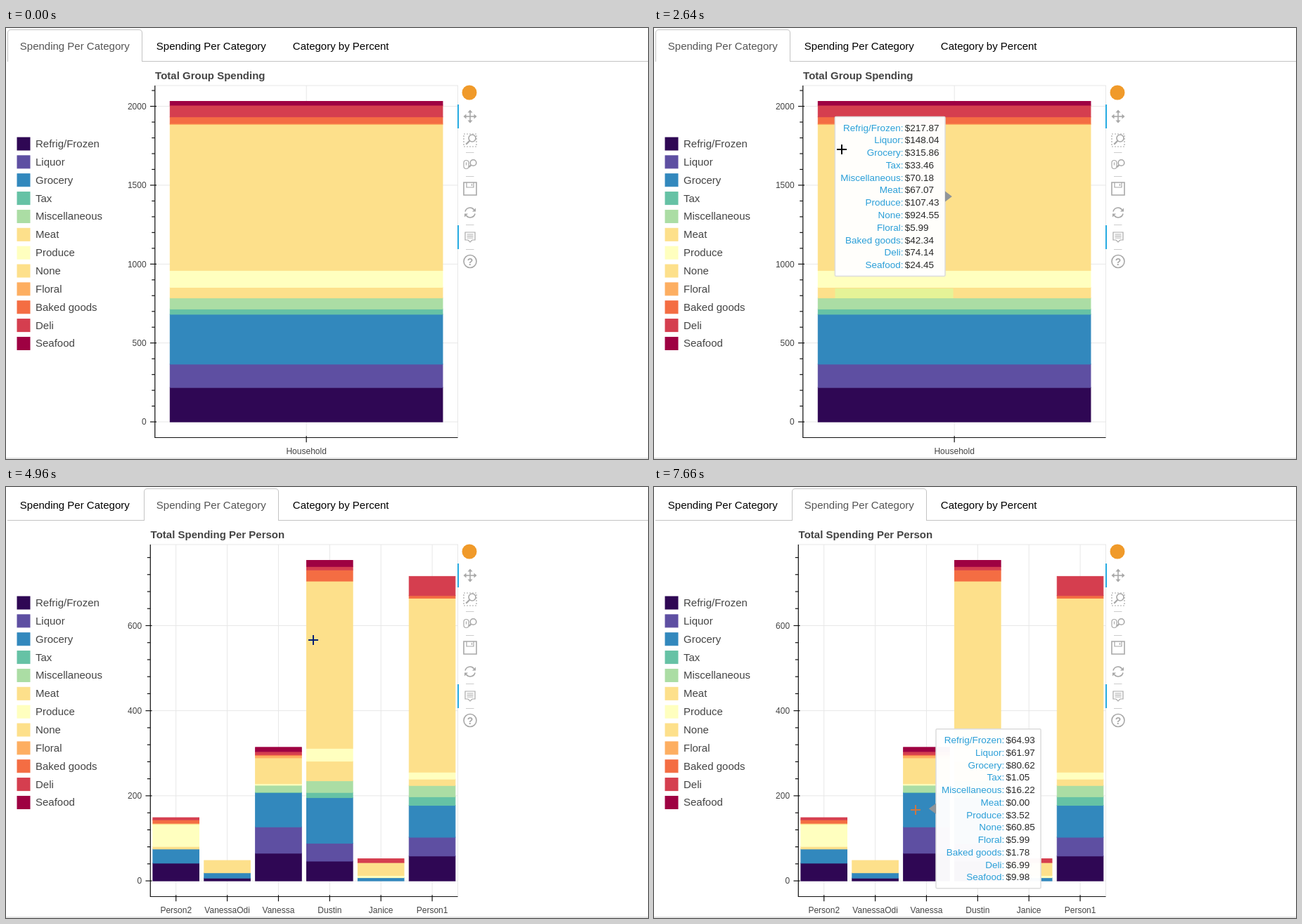
Write an HTML page that moves like this. It is 913 px wide and 614 px high and loops after 8000 ms.

```html
<!DOCTYPE html>
<html lang="en">
<head>
<meta charset="utf-8">
<title>Group spending</title>
<style>
html, body { margin: 0; width: 100%; height: 100%; overflow: hidden; background: #fff; }
svg { display: block; font-family: "Liberation Sans", Arial, sans-serif; }
text { white-space: pre; }
.tab, .legend { font-size: 15px; }
.legend { fill: #444; }
.tab.active { fill: #555; }
.title { font-size: 15px; font-weight: bold; fill: #444; }
.tick { font-size: 12px; fill: #444; }
.rule { stroke: #c4c4c4; }
.grid { stroke: #e7e7e7; fill: none; }
.axis { stroke: #111; stroke-width: 1.2; fill: none; }
.tip { font-size: 13.5px; fill: #2b9fd8; }
.tip .value { fill: #282828; }
.icons { stroke: #a8a8a8; stroke-width: 1.6; fill: none; }
.icons .thin { stroke-width: 1.2; }
.icons .thick { stroke-width: 2.3; }
.icons .solid { fill: #a8a8a8; stroke: none; }
.icons text { font-size: 14px; font-weight: bold; }
.divider { stroke: #ccc; }
#cross { stroke: #fff; stroke-width: 2; mix-blend-mode: difference; }
</style>
</head>
<body>
<svg id="stage" width="913" height="614" viewBox="0 0 913 614"></svg>
<script>
const LOOP = 8000, SWITCH = 3980, STEP = 120;
const BASE = 561.1, RISE = 456.6, TOP = 82, BOTTOM = 583.5, RIGHT = 642.5;

const colors = {
  'Refrig/Frozen': '#2f0754', Liquor: '#5e4fa2', Grocery: '#3288bd', Tax: '#66c2a5',
  Miscellaneous: '#abdda4', Meat: '#fde08b', Produce: '#ffffbf', None: '#fde08b',
  Floral: '#fdae61', 'Baked goods': '#f46d43', Deli: '#d53e4f', Seafood: '#9e0142'
};
const categories = Object.keys(colors);

// Spending per person; a missing category is zero
const people = {
  Person2: { 'Refrig/Frozen': 41.62, Grocery: 33.2, Meat: 5.99, Produce: 52, None: 2.49, 'Baked goods': 8.28, Deli: 5 },
  VanessaOdi: { 'Refrig/Frozen': 6.51, Grocery: 12.4, None: 29 },
  Vanessa: { 'Refrig/Frozen': 64.93, Liquor: 61.97, Grocery: 80.62, Tax: 1.05, Miscellaneous: 16.22,
    Produce: 3.52, None: 60.85, Floral: 5.99, 'Baked goods': 1.78, Deli: 6.99, Seafood: 9.98 },
  Dustin: { 'Refrig/Frozen': 46.41, Liquor: 41.96, Grocery: 107.25, Tax: 12.17, Miscellaneous: 27.47, Meat: 46.1,
    Produce: 30.19, None: 393.11, 'Baked goods': 26.29, Deli: 7.99, Seafood: 14.47 },
  Janice: { Grocery: 7.44, Produce: 5.3, None: 30.2, Deli: 9 },
  Person1: { 'Refrig/Frozen': 58.4, Liquor: 44.11, Grocery: 74.95, Tax: 20.24, Miscellaneous: 26.49, Meat: 14.98,
    Produce: 16.42, None: 408.9, 'Baked goods': 5.99, Deli: 45.16 }
};
const household = {};
for (const c of categories) household[c] = Object.values(people).reduce((s, p) => s + (p[c] || 0), 0);

const text = (cls, x, y, s, anchor = 'start') =>
  `<text class="${cls}" x="${x}" y="${y}" text-anchor="${anchor}">${s}</text>`;
const path = (cls, d) => `<path class="${cls}" d="${d}"/>`;
const line = (cls, x1, y1, x2, y2) => path(cls, `M${x1} ${y1}L${x2} ${y2}`);
const rect = (x, y, w, h, attrs) => `<rect x="${x}" y="${y}" width="${w}" height="${h}" ${attrs}/>`;
const paint = color => `fill="${color}" stroke="${color}"`;

function makeChart(title, left, data, major, minor) {
  const names = Object.keys(data), pitch = (RIGHT - left) / names.length;
  const total = name => Object.values(data[name]).reduce((a, b) => a + b);
  const scale = RISE / Math.max(...names.map(total));
  const y = v => BASE - v * scale;
  const bars = names.map((name, i) => {
    let sum = 0;
    const x = left + (i + 0.5) * pitch;
    const parts = categories.map(cat => {
      const value = data[name][cat] || 0, bottom = y(sum);
      sum += value;
      return { cat, value, bottom, top: y(sum) };
    });
    return { name, x, w: pitch * 0.9, parts, side: x < (left + RIGHT) / 2 - 1 ? 1 : -1 };
  });
  return { title, left, major, minor, y, bars };
}
const charts = [
  makeChart('Total Group Spending', 211.8, { Household: household }, 500, 100),
  makeChart('Total Spending Per Person', 205.3, people, 200, 40)
];
const pageAt = t => t < SWITCH ? 0 : 1;

function drawChart({ title, left, major, minor, y, bars }, id) {
  let grid = rect(left, TOP, RIGHT - left, BOTTOM - TOP, 'class="grid"'), stacks = '';
  let axes = path('axis', `M${left} ${TOP}V${BOTTOM}H${RIGHT}`);
  for (let v = 0; y(v) > TOP; v += minor) {
    const isMajor = v % major === 0;
    axes += line('axis', left - (isMajor ? 6.8 : 4.5), y(v), left + (isMajor ? 2.2 : 0), y(v));
    if (!isMajor) continue;
    grid += line('grid', left, y(v), RIGHT, y(v));
    axes += text('tick', left - 12.2, y(v) + 4.3, v, 'end');
  }
  for (const { name, x, w, parts } of bars) {
    grid += line('grid', x, TOP, x, BOTTOM);
    axes += line('axis', x, BOTTOM - 2.2, x, BOTTOM + 6.8) + text('tick', x, 607, name, 'middle');
    for (const p of parts) {
      if (p.value) stacks += rect(x - w / 2, p.top, w, p.bottom - p.top, paint(colors[p.cat]));
    }
  }
  return `<g id="chart${id}">${grid}${stacks}${axes}${text('title', left + 0.3, 73.3, title)}</g>`;
}

const tabX = i => 2.5 + i * 194;
const tabShape = i => `M${tabX(i)} 48V7q0-4.500 4.500-4.500h182q4.500 0 4.500 4.500V48`.replace(/00 /g, ' ');
const drawTabs = () =>
  line('rule', 2, 47.5, 913, 47.5) +
  `<path id="hoverTab" d="${tabShape(1)}" fill="#ececec"/>` +
  '<path id="activeTab" class="rule" fill="#fff"/>' +
  ['Spending Per Category', 'Spending Per Category', 'Category by Percent']
    .map((s, i) => text('tab', tabX(i) + 17.3, 31, s)).join('');

const drawLegend = () => categories.map((name, i) => {
  const y = 165 + i * 25.86;
  return rect(16, y - 9, 18, 18, paint(colors[name])) + text('legend', 42, y + 5, name);
}).join('');

function drawTools() {
  const at = (y, body) => `<g transform="translate(660 ${y})">${body}</g>`;
  const turn = (count, body) => Array.from({ length: count }, (_, i) =>
    `<g transform="rotate(${i * 360 / count})">${body}</g>`).join('');
  const lens = (x, y, r, end) => `<circle cx="${x}" cy="${y}" r="${r}" fill="#fff"/>` +
    path('thick', `M${x - r * 0.75} ${y + r * 0.75}l${-end} ${end}`);
  return '<circle cx="659" cy="92" r="10.5" fill="#f09a2a"/>' +
    [109, 281].map(y => rect(642, y, 2, 34, 'fill="#26aae1"')).join('') +
    [177.5, 211.5, 280.5, 315.5].map(y => line('divider', 654, y, 665.5, y)).join('') +
    '<g class="icons">' +
    at(126, turn(4, path('', 'M0 0V-7') + path('solid', 'M0-9.5L3.5-5.5H-3.5Z'))) +
    at(160, '<rect class="thin" x="-9" y="-9" width="18" height="18" stroke-dasharray="2 2"/>' + lens(3, -3, 5, 5)) +
    at(194.5, '<rect class="thin" x="-9" y="-6" width="7" height="12" rx="3.5"/>' +
      path('thin', 'M-5.5-3V1') + lens(4.5, -2.5, 4.3, 3)) +
    at(229, path('', 'M-9-9H9V9H-9Z') + path('thin', 'M-5-9V-2H5V-9M2.5-7V-4')) +
    at(263, turn(2, path('', 'M-7-1.5A7 7 0 0 1 5.5-4') + path('solid', 'M8-6.5V-1.5H3Z'))) +
    at(298, path('thin', 'M-7-7H7V4H3L0 7-3 4H-7ZM-4.5-4H4.5M-4.5-1.5H4.5M-4.5 1H4.5')) +
    at(332.5, '<circle r="9"/>' + text('solid', 0, 5, '?', 'middle')) + '</g>';
}

function drawTip(hit) {
  if (!hit) return '';
  const { bar: { x, side, parts }, part } = hit;
  const mid = (part.top + part.bottom) / 2 - 1.5;
  const w = parts.some(p => p.value >= 100) ? 156.6 : 149.1;
  const edge = Math.round(x + side * 13.4), left = side > 0 ? edge : edge - w;
  const rows = parts.map((p, i) => {
    const y = mid - 93.3 + i * 17.77;
    return text('', left + 97.2, y, p.cat + ':', 'end') + text('value', left + 99.4, y, '$' + p.value.toFixed(2));
  }).join('');
  return rect(left, mid - 113.5, w, 227, 'rx="1.5" fill="#fff" fill-opacity=".97" stroke="#dcdcdc" stroke-width="1.5"') +
    `<path d="M${edge} ${mid - 7.5}v15L${x + side * 3.3} ${mid}Z" fill="#909599"/>` + rows;
}

// Pointer glides: start, number of steps, bend point, end point
const glides = [
  [400, 1, [258, 606], [258, 606]],
  [550, 6, [296, 528], [334, 451]],
  [2400, 7, [216, 3], [266, 38]],
  [3240, 2, [267, 36], [269, 35]],
  [4480, 6, [400, 120], [444, 235]],
  [5830, 4, [597, 285], [607, 282]],
  [6940, 7, [640, 590], [372, 460]]
];
const smooth = u => u * u * (3 - 2 * u);
const bezier = (a, b, c, u) => a * (1 - u) ** 2 + 2 * b * u * (1 - u) + c * u * u;

const inPlot = ({ t, x, y }) => x > charts[pageAt(t)].left && x < RIGHT && y > TOP && y < BOTTOM;
function hitTest({ t, x, y }) {
  const bar = charts[pageAt(t)].bars.find(b => Math.abs(x - b.x) < b.w / 2);
  const part = bar && bar.parts.find(p => y < p.bottom && y >= p.top);
  return part && { bar, part };
}

// The tooltip trails the pointer by one step and clears once it leaves the plot
const poses = [{ t: 0, x: -50, y: -50, tip: null }];
let from = [258, 606];
for (const [start, count, bend, end] of glides) {
  for (let k = 1; k <= count; k++) {
    const u = smooth(k / count), last = poses[poses.length - 1];
    const [x, y] = [0, 1].map(i => Math.round(bezier(from[i], bend[i], end[i], u)));
    const pose = { t: start + (k - 1) * STEP, x, y };
    pose.tip = inPlot(pose) ? hitTest(last) || last.tip : null;
    poses.push(pose);
  }
  from = end;
}

const stage = document.getElementById('stage');
stage.innerHTML = drawTabs() + drawLegend() + charts.map(drawChart).join('') +
  rect(257.5, 371, 168, 14, 'id="tint" fill="#e5f397"') + drawTools() +
  line('rule', 0, 613, 913, 613) + '<g id="tip" class="tip"></g>' +
  '<path id="arrow" d="M0 0V11L2.5 8.7 4.3 12.8 5.9 12.1 4.2 8.2H7.6Z" fill="#fff" stroke="#222" stroke-width=".9"/>' +
  '<path id="cross" d="M-7 0H7M0-7V7"/>';

const el = id => document.getElementById(id);
const show = (id, on) => { el(id).style.display = on ? '' : 'none'; };
const labels = document.querySelectorAll('.tab');
let lastTip = null;

function render(t) {
  const page = pageAt(t);
  const pose = poses.filter(p => p.t <= t).pop();
  charts.forEach((c, i) => show('chart' + i, i === page));
  el('activeTab').setAttribute('d', tabShape(page));
  labels.forEach((n, i) => n.classList.toggle('active', i === page));
  show('hoverTab', page === 0 && pose.y > 0 && pose.y < 47);
  show('tint', page === 0 && t >= 2400);

  if (pose.tip !== lastTip) el('tip').innerHTML = drawTip(lastTip = pose.tip);

  const crossing = inPlot(pose);
  show('cross', crossing);
  show('arrow', !crossing);
  el(crossing ? 'cross' : 'arrow').setAttribute('transform', `translate(${pose.x} ${pose.y})`);
}

const start = performance.now();
function tick() {
  render((performance.now() - start) % LOOP);
  requestAnimationFrame(tick);
}
tick();
</script>
</body>
</html>
```
